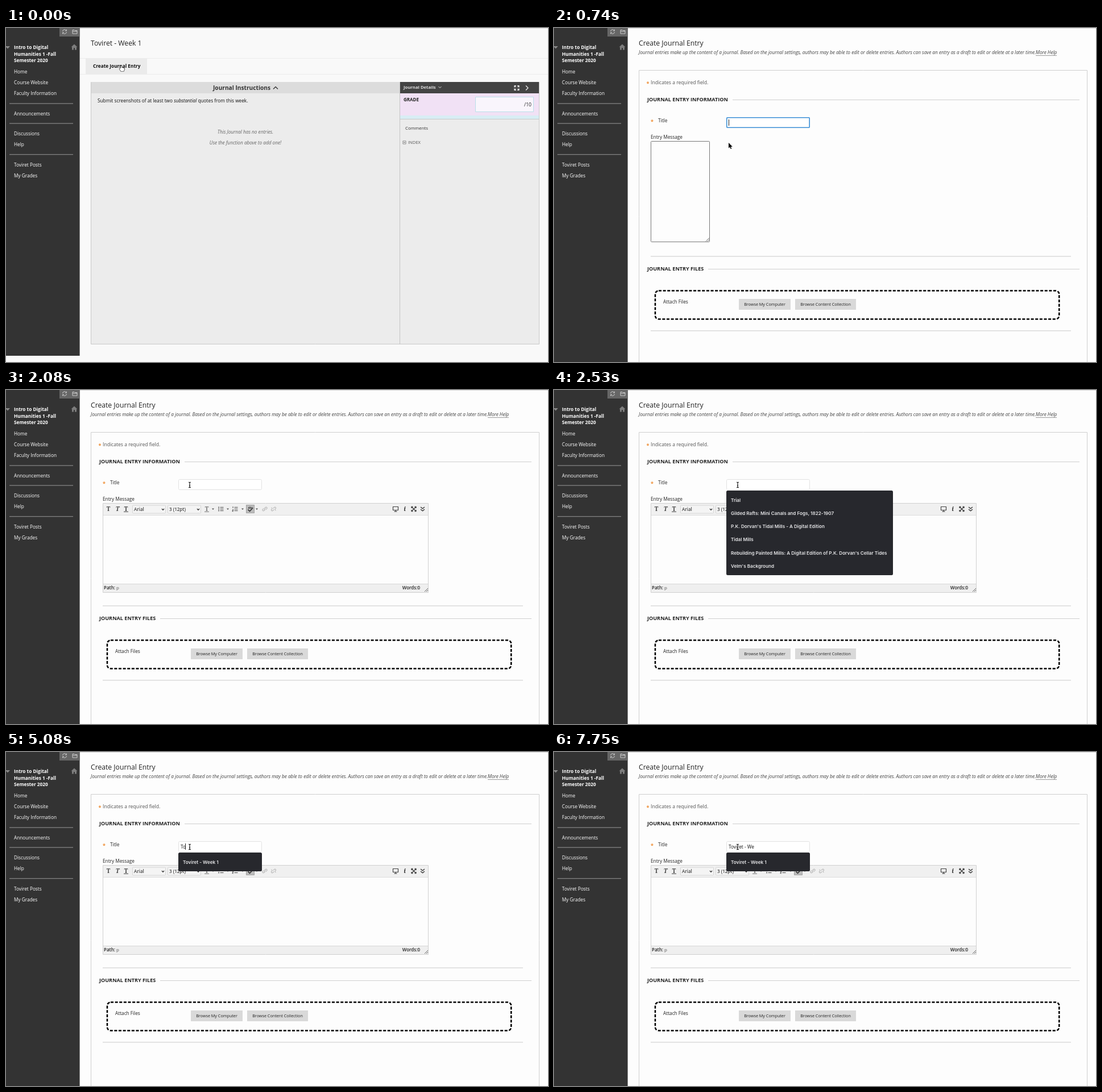
Recreate the animation shown at these times as an HTML page with a canvas. Size 953 by 588 pixels, loop 8 s.

```html
<!DOCTYPE html>
<html lang="en">
<head>
<meta charset="utf-8">
<title>Journal entry</title>
<style>
html, body { margin: 0; width: 953px; height: 588px; overflow: hidden; background: #fdfdfd; }
canvas { display: block; }
</style>
</head>
<body>
<canvas id="stage" width="953" height="588"></canvas>
<script>
const ctx = document.getElementById('stage').getContext('2d');
const LOOP = 8000;
const BODY = 8.25;
const SANS = '"Open Sans", sans-serif';
const SERIF = '"Noto Serif", serif';
const UI = 'Inter, sans-serif';
const INK = '#222';
const ICON = '#444';
const FADED = '#bbb';

const PAGE_AT = 590, EDITOR_AT = 1180, COLLAPSE_AT = 1630, MENU_AT = 2530;
const TITLE = 'Toviret - Week 1';
// [time, typed characters]
const TYPING = [[0, 0], [4030, 1], [4480, 2], [5230, 3], [5380, 4], [5530, 6], [5680, 7], [5980, 8],
  [6120, 9], [6420, 11], [6710, 12], [6860, 13], [7160, 14], [7610, 13], [7750, 12]];
// [time, x, y]
const POINTER = [[0, 204, 71], [300, 204, 71], [740, 307, 202], [1040, 307, 202], [1480, 322.5, 171],
  [1780, 323, 167], [LOOP, 323, 167]];
const SUGGESTIONS = ['Trial', 'Gilded Rafts: Mini Canals and Fogs, 1822-1907',
  "P.K. Dorvan's Tidal Mills - A Digital Edition", 'Tidal Mills',
  "Rebuilding Painted Mills: A Digital Edition of P.K. Dorvan's Cellar Tides", "Velm's Background"];

function text(str, x, cy, { size = BODY, color = INK, style = '', align = 'left', family = SANS } = {}) {
  ctx.font = `${style} ${size}px ${family}`;
  ctx.fillStyle = color;
  ctx.textAlign = align;
  ctx.fillText(str, x, cy + size * 0.357);
  return ctx.measureText(str).width;
}

function rect(x, y, w, h, fill, border, radius = 0, width = 1) {
  if (fill) {
    ctx.fillStyle = fill;
    ctx.beginPath();
    ctx.roundRect(x, y, w, h, radius);
    ctx.fill();
  }
  if (border) {
    ctx.strokeStyle = border;
    ctx.lineWidth = width;
    ctx.beginPath();
    ctx.roundRect(x + width / 2, y + width / 2, w - width, h - width, radius);
    ctx.stroke();
  }
}

const rule = (x1, x2, y, color = '#c9c9c9') => rect(x1, y, x2 - x1, 1, color);

// SVG path drawn around (x, y)
function path(d, x, y, { stroke, fill, width = 1 } = {}) {
  const shape = new Path2D(d);
  ctx.save();
  ctx.translate(x, y);
  ctx.lineJoin = 'round';
  if (stroke) { ctx.strokeStyle = stroke; ctx.lineWidth = width; ctx.stroke(shape); }
  if (fill) { ctx.fillStyle = fill; ctx.fill(shape); }
  ctx.restore();
}

const line = (d, x, y, stroke = ICON, width = 1) => path(d, x, y, { stroke, width });
const arrow = (x, y) => path('M-2-1H2L0 1.5Z', x, y, { fill: '#555' });

function sidebar(height) {
  rect(0, 0, 129.6, height, '#333');
  rect(94, 0, 35.6, 15, '#666');
  line('M-3.5-.5A3.5 3.5 0 0 1 3-2M3.5.5A3.5 3.5 0 0 1-3 2M3.4-4V-1.5H1M-3.4 4V1.5H-1', 103, 6.5, '#ccc');
  line('M-4-3H-1L0-2H4V3.5H-4ZM-4-.5H4', 121, 6.5, '#ccc');
  path('M0-5L5.5 0H4V5H1V1.5H-1V5H-4V0H-5.5Z', 120, 33.5, { fill: '#7d7d7d' });
  path('M-4-2H4L0 2.5Z', 3, 34, { fill: '#888' });
  ['Intro to Digital', 'Humanities 1 -Fall', 'Semester 2020'].forEach((row, i) =>
    text(row, 14, 34.3 + i * 11.6, { style: 'bold', color: '#fff' }));
  const links = { 'Home': 77, 'Course Website': 96.3, 'Faculty Information': 115.5, 'Announcements': 151,
    'Discussions': 186.3, 'Help': 205.5, 'Toviret Posts': 240.8, 'My Grades': 260 };
  for (const [label, y] of Object.entries(links)) text(label, 14, y, { color: '#fff' });
  for (const y of [132.4, 167.4, 222.2]) rule(6, 118, y, '#999');
}

function journalPage() {
  rect(0, 0, 953, 588, '#f9f9f9');
  rule(130, 953, 0, '#ddd');
  sidebar(577);
  text(TITLE, 149, 27, { size: 12.2 });
  rule(130, 953, 53, '#ececec');
  rule(130, 953, 81, '#ececec');
  rect(140, 53, 108, 28, '#ebebeb');
  text('Create Journal Entry', 153, 67.3, { style: 'bold', color: '#111' });

  rect(149, 95, 789, 462, '#ececec', '#c9c9c9');
  rect(150, 95, 543, 20, '#dcdcdc');
  text('Journal Instructions', 364, 105.3, { style: 'bold', size: 10.16, color: '#333' });
  line('M-4 2L0-2L4 2', 474, 105.5, '#333', 1.3);
  let x = 161;
  x += text('Submit screenshots of at least two ', x, 128.3, { color: '#111' });
  x += text('substantial', x, 128.3, { style: 'italic', color: '#111' });
  text(' quotes from this week.', x, 128.3, { color: '#111' });
  const note = { style: 'italic', color: '#666', align: 'center' };
  text('This Journal has no entries.', 421, 183, note);
  text('Use the function above to add one!', 421, 202.3, note);

  rect(692, 95, 1, 462, '#c4c4c4');
  rect(693, 95, 244, 20, '#444');
  text('Journal Details', 699, 104.3, { style: 'bold', size: 7.7, color: '#ddd' });
  line('M-2.5-1L0 1.5L2.5-1', 763, 104, '#ddd');
  line('M-1.5-1.5L-4-4M-4-1V-4H-1M1.5-1.5L4-4M1-4H4V-1M-1.5 1.5L-4 4M-4 1V4H-1M1.5 1.5L4 4M4 1V4H1', 898, 105.5, '#eee', 1.2);
  line('M-2-4L2 0L-2 4', 916, 105.5, '#eee', 1.3);
  rect(693, 115, 244, 39, '#f1e1f5');
  rect(693, 154, 244, 6, '#d8edf4');
  rule(693, 937, 160, '#c9c9c9');
  text('GRADE', 699, 126.5, { style: 'bold', size: 8 });
  rect(825, 121, 103, 27, '#f9f5fc', '#b9dfe9');
  text('/10', 924, 135, { size: 8.6, align: 'right' });
  text('Comments', 702, 176, { size: 7.85, color: '#333' });
  rect(697.5, 198.5, 6, 6, null, '#777', 0, 0.8);
  line('M-1.5 0H1.5', 700.5, 201.5, '#555', 0.8);
  text('INDEX', 707, 201, { size: 7.6, color: '#555' });
}

function letterT(x, y, kind, color = ICON) {
  text('T', x, y, { size: 10, style: kind === 'italic' ? 'italic bold' : 'bold', family: SERIF, align: 'center', color });
  if (kind === 'under') line('M-4 4.8H4', x, y, color);
  if (kind === 'strike') line('M-4 0H4', x, y, color);
}

function select(label, x, y, w) {
  rect(x, y - 7, w, 15, '#f4f4f4', '#d6d6d6', 1);
  text(label, x + 3, y + 0.3, { size: 8, style: '600', color: '#444' });
  line('M-2-1L0 1.3L2-1', x + w - 5, y + 0.5, '#333', 1.2);
}

function list(x, y, numbered) {
  line('M-1.5-3H4.5M-1.5 0H4.5M-1.5 3H4.5', x, y, ICON, 1.2);
  if (numbered) line('M-4-4.5V-1.5M-5 1.2H-3.4V2.6H-5V4.2H-3.2', x, y, ICON, 0.9);
  else line('M-4.8-3H-3M-4.8 0H-3M-4.8 3H-3', x, y, ICON, 1.6);
}

function chain(x, y, broken, color = ICON) {
  line('M-.5-1L1.2-2.8Q2.5-4 3.6-2.7T3.4-.4L1.8 1.2M.5 1L-1.2 2.8Q-2.5 4-3.6 2.7T-3.4.4L-1.8-1.2', x, y, color, 1.2);
  line(broken ? 'M-4-2.5L-2.5-1.5M4 2.5L2.5 1.5' : 'M-1.3 1.3L1.3-1.3', x, y, color, 1.1);
}

function spellCheck(x, y) {
  text('abc', x, y - 2.5, { size: 4.5, style: 'bold', align: 'center', color: '#333' });
  line('M-4 1L-1 4L4.5-2', x, y, '#333', 1.7);
}

function align(x, y, offsets) {
  offsets.forEach(([from, to], i) => line(`M${from} 0H${to}`, x, y - 4 + i * 2.6, ICON, 1.2));
}

function toolbarMain() {
  const y = 209.5;
  letterT(180, y);
  letterT(196, y, 'italic');
  letterT(211, y, 'under');
  select('Arial', 222, y, 59);
  select('3 (12pt)', 284, y, 59);
  letterT(353, y, 'under', '#777');
  list(378, y);
  list(403, y, true);
  rect(422, 202, 15, 15, '#bcbcbc', '#a2a2a2');
  spellCheck(429.5, y);
  for (const x of [364, 390, 416, 441]) arrow(x, y);
  chain(455, y, false, FADED);
  chain(470.5, y, true, FADED);
  line('M-4.5-4H4.5V2H-4.5ZM-2.5 4.3H2.5M0 2V4', 685, y, ICON, 1.2);
  text('i', 701, y, { size: 10.5, style: 'italic bold', family: SERIF, align: 'center', color: '#333' });
  line('M-4-4L4 4M4-4L-4 4M-4-1.5V-4H-1.5M1.5-4H4V-1.5M4 1.5V4H1.5M-1.5 4H-4V1.5', 717, y, ICON, 1.3);
  line('M-3.5-3.5L0-.7L3.5-3.5M-3.5.5L0 3.3L3.5.5', 732.5, y, ICON, 1.5);
}

function toolbarExtra() {
  let y = 230;
  ['', 'italic', 'under', 'strike'].forEach((kind, i) => letterT(178 + i * 15.3, y, kind));
  select('Paragraph', 235, y, 59);
  select('-- Font famil', 297, y, 58);
  select('-- Font size -', 358, y, 58);
  list(427, y);
  list(444, y, true);
  arrow(475, y);
  path('M-4 4L-3 1L2-4L4.5-1.5L-.5 3.5Z', 489, y, { fill: ICON });
  arrow(501, y);
  path('M-4.5 1L1-4L5-1L0 4H-2.5Z', 514, y, { fill: '#777', stroke: ICON });

  y = 247.5;
  line('M-2.5-4L2 2M2.5-4L-2 2M-4 3A1.5 1.5 0 1 0-1 3A1.5 1.5 0 1 0-4 3M1 3A1.5 1.5 0 1 0 4 3A1.5 1.5 0 1 0 1 3', 180, y, ICON, 1.1);
  line('M-3-4H1L3.5-1.5V4H-3ZM1-4V-1.5H3.5', 196, y);
  line('M-3.5-3H3V4H-3.5ZM-1.5-4H1V-2H-1.5ZM0 0H3', 212, y);
  line('M-3.5-.5A3 3 0 1 0 2.5-.5A3 3 0 1 0-3.5-.5M1.6 1.6L4 4', 227, y, ICON, 1.5);
  line('M-4-1H2A2.5 2.5 0 0 1 2 3.5H0M-1.5-3.5L-4-1L-1.5 1.5', 244, y, FADED, 1.2);
  line('M4-1H-2A2.5 2.5 0 0 0-2 3.5H0M1.5-3.5L4-1L1.5 1.5', 259, y, FADED, 1.2);
  align(278, y, [[-4.5, 4.5], [-4.5, 2], [-4.5, 4.5], [-4.5, 2]]);
  align(293.3, y, [[-4.5, 4.5], [-3, 3], [-4.5, 4.5], [-3, 3]]);
  align(308.6, y, [[-4.5, 4.5], [-2, 4.5], [-4.5, 4.5], [-2, 4.5]]);
  align(324, y, Array(4).fill([-4.5, 4.5]));
  align(342, y, [[-4.5, 4.5], [0, 4.5], [0, 4.5], [-4.5, 4.5]]);
  path('M-4.5-2L-1.5 0L-4.5 2Z', 342, y, { fill: ICON });
  line('M-4.5-4H4.5M0-1H4.5M0 1.5H4.5M-4.5 4H4.5', 357, y, FADED);
  letterT(375, y);
  text('2', 378.5, y - 3, { size: 5, style: 'bold', color: ICON });
  letterT(390, y);
  text('x', 393.5, y + 3, { size: 5, style: 'bold', color: ICON });
  chain(409, y);
  chain(425, y, true);
  text('•¶', 442, y, { size: 8, style: 'bold', align: 'center', color: ICON });
  text('¶', 454, y, { size: 8, style: 'bold', color: ICON });
  rect(456, 237, 15, 15, '#8d8d8d');
  line('M-5 0H5', 475, y, '#888');
  line('M-4.5 0H4.5', 491, y, ICON, 1.6);
  line('M-4 1V3.5H4V1', 507, y + 1);
  spellCheck(524, y);
}

function grip(x, y) {
  line('M-6 0L0-6M-3 0L0-3', x, y, '#555', 0.9);
}

function editor(expanded) {
  rect(170, 199, 573, 158, '#fdfdfd', '#d0d0d0');
  const bottom = expanded ? 257 : 220;
  rect(171, 200, 571, bottom - 200, '#f0f0f0');
  rule(171, 742, bottom, '#ddd');
  toolbarMain();
  if (expanded) toolbarExtra();
  rect(171, 341, 571, 15, '#efefef');
  rule(171, 742, 341, '#d6d6d6');
  const x = 172 + text('Path: ', 172, 348.5, { size: 8, style: '600' });
  text('p', x, 348.5, { size: 8, color: '#555' });
  text('Words:0', 728, 348.5, { size: 8, style: '600', align: 'right' });
  grip(742, 355);
}

function section(label, y, lineFrom) {
  text(label, 164, y, { size: 9.1, style: 'bold' });
  rule(lineFrom, 924, y, '#cfcfcf');
}

function filesSection(dy) {
  rule(170, 909, 401.5 + dy);
  section('JOURNAL ENTRY FILES', 424 + dy, 271);
  ctx.setLineDash([5.08, 2.546]);
  rect(176.7, 461.3 + dy, 712.8, 52.4, null, '#000', 6, 2.54);
  ctx.setLineDash([]);
  text('Attach Files', 192, 482.3 + dy);
  rect(325, 477 + dy, 91, 19, '#d9d9d9');
  rect(424, 477 + dy, 107, 19, '#d9d9d9');
  text('Browse My Computer', 370.5, 486.6 + dy, { size: 7.22, align: 'center' });
  text('Browse Content Collection', 477.5, 486.6 + dy, { size: 7.22, align: 'center' });
  rule(170, 909, 532.5 + dy);
}

function titleField(t, loaded) {
  if (loaded) rect(303, 157, 147, 19, '#fff', '#e2e2e2', 2);
  else rect(303, 157, 147, 19, '#fff', '#3c8fd6', 1, 1.6);
  const typed = TITLE.slice(0, TYPING.findLast(([at]) => t >= at)[1]);
  const end = 307 + text(typed, 307, 167, { color: '#111' });
  const caret = !loaded || (t >= 2680 && t < 3280) || (t >= 3730 && t < 6420);
  if (caret) rect(Math.floor(end), 161, 1, 11, '#222');
  return typed;
}

function suggestions(items, width) {
  const step = 23.2;
  rect(303, 177, width, 33 + (items.length - 1) * step, '#27282d', null, 2.5);
  items.forEach((item, i) =>
    text(item, 311, 193.8 + i * step, { size: 8.15, style: '600', color: '#e6e6e8', family: UI }));
}

function menu(t) {
  if (t < MENU_AT) return;
  if (t < 4030) suggestions(SUGGESTIONS, 293);
  else suggestions(t < 4780 ? ['Trial', TITLE] : [TITLE], 147);
}

function entryPage(t) {
  const loaded = t >= EDITOR_AT;
  rect(0, 0, 953, 588, '#fdfdfd');
  rule(130, 953, 0, '#ddd');
  sidebar(588);
  text('Create Journal Entry', 149, 27, { size: 12.2 });
  const help = { style: 'italic', color: '#444' };
  text('Journal entries make up the content of a journal. Based on the journal settings, authors may be able to edit or delete entries. Authors can save an entry as a draft to edit or delete at a later time.',
    149, 43, help);
  text('More Help', 847, 43, help);
  rule(847, 884, 48, '#999');
  rect(149, 74, 789, 530, null, '#cfcfcf');
  const star = { size: 9, style: 'bold', color: '#ee8a2e', align: 'center' };
  text('*', 165, 98, star);
  text('Indicates a required field.', 170, 96.3, { size: 8.6, color: '#555' });
  section('JOURNAL ENTRY INFORMATION', 126, 314);
  text('*', 172.5, 165, star);
  text('Title', 183, 163);
  text('Entry Message', 170, 192);
  titleField(t, loaded);
  if (loaded) {
    editor(t < COLLAPSE_AT);
  } else {
    rect(170, 199, 104, 178, '#fdfdfd', '#777', 1);
    grip(273, 375.5);
  }
  filesSection(loaded ? -22 : 0);
  menu(t);
}

function pointer(t) {
  const i = POINTER.findLastIndex(([at]) => t >= at);
  const [t0, x0, y0] = POINTER[i];
  const [t1, x1, y1] = POINTER[i + 1];
  const u = (t - t0) / (t1 - t0);
  const k = u * u * (3 - 2 * u);
  const x = x0 + (x1 - x0) * k, y = y0 + (y1 - y0) * k;
  if (t < PAGE_AT) {
    path('M-2 5L-4.5 1Q-4.5-.5-2.5 .5V-4Q-1.5-5.5-.7-4V-1Q.5-2 1.3-.8Q2.5-1.5 3 0Q4.5-.3 4.3 1.5L3 5Z', x, y, { stroke: '#111', fill: '#fff', width: 1.2 });
  } else if (t < EDITOR_AT) {
    path('M0 0V9.5L2.2 7.5L3.8 11L5.3 10.3L3.8 7H6.8Z', x, y, { stroke: '#fff', fill: '#000', width: 1.2 });
  } else {
    const beam = 'M-2-4.8Q0-4.8 0-3.5Q0-4.8 2-4.8M0-3.5V3.5M-2 4.8Q0 4.8 0 3.5Q0 4.8 2 4.8M-1 1H1';
    line(beam, x, y, '#fff', 2.4);
    line(beam, x, y, '#111', 1.1);
  }
}

function draw(now) {
  const t = now % LOOP;
  if (t < PAGE_AT) journalPage();
  else entryPage(t);
  pointer(t);
  requestAnimationFrame(draw);
}
requestAnimationFrame(draw);
</script>
</body>
</html>
```
